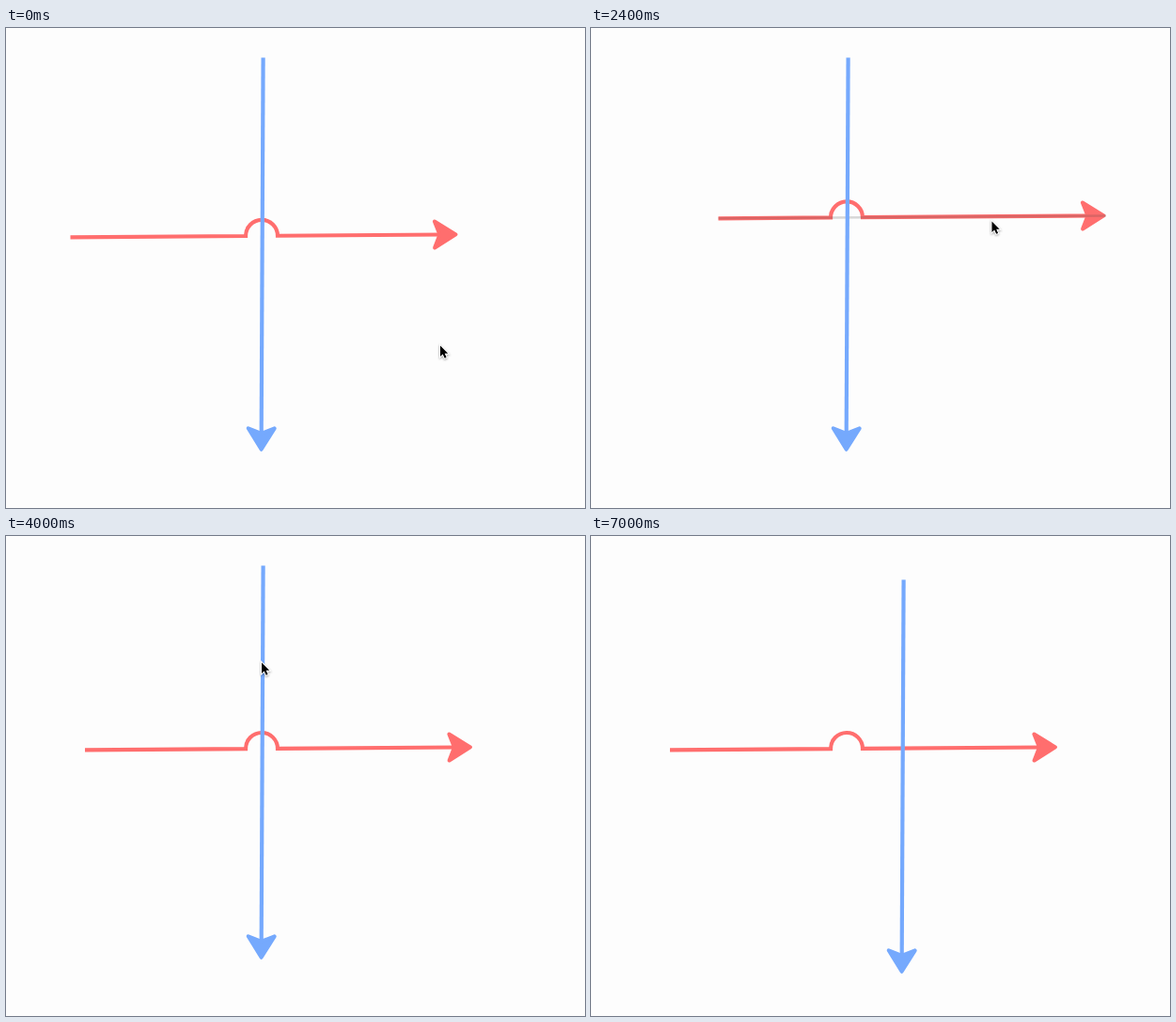
These frames come from a looping animation (616x510 px, 7.1 s). An HTML page:

```html
<!DOCTYPE html>
<html lang="en">
<head>
<meta charset="utf-8">
<title>Line jump</title>
<style>
  html, body { margin: 0; width: 100%; height: 100%; overflow: hidden; background: #fdfdfd; }
  svg { display: block; }
  .line { fill: none; stroke-width: 4.2; }
  .head { stroke-width: 4; stroke-linejoin: round; }
  .guide { stroke: #444; stroke-width: 2.5; opacity: .2; }
  .red .line, .red .head { stroke: #ff6e6e; }
  .red .head { fill: #ff6e6e; }
  .blue .line, .blue .head { stroke: #75a9fd; }
  .blue .head { fill: #75a9fd; }
  #cursor { filter: drop-shadow(0 1px 1px rgba(0, 0, 0, .35)); }
</style>
</head>
<body>
<svg width="616" height="510" viewBox="0 0 616 510">
  <g class="red"><path class="line"/><path class="head"/><path class="guide"/></g>
  <g class="blue"><path class="line"/><path class="head"/><path class="guide"/></g>
  <path id="cursor" d="M1 1.5V13L3.7 10.5L5.7 14.8L7.6 14L5.7 9.7H9.2Z"
        stroke="#fff" stroke-width="2" paint-order="stroke"/>
</svg>
<script>
const LOOP = 7100, STEP = 100;
const HEAD = 'M-2.5 0L-25 -14L-19.5 0L-25 14Z';
const JUMP = { x: 272, r: 17 };

const add = (...points) => points.reduce(([ax, ay], [bx, by]) => [ax + bx, ay + by]);

// A shift by (dx, dy) between two times; power 1 is steady, 2 slows down at the end
function slide(t, start, end, dx, dy, power = 2) {
  const p = Math.min(1, Math.max(0, (t - start) / (end - start)));
  const eased = 1 - (1 - p) ** power;
  return [dx * eased, dy * eased];
}

const redShift = t => add(
  slide(t, 1800, 2400, 67, -20),
  slide(t, 2400, 2700, -33, 10),
  slide(t, 2700, 3200, -18.5, 15));

const blueShift = t => add(
  slide(t, 4500, 4900, 100, 64),
  slide(t, 4900, 5300, -41, -49));

// The pointer also follows whatever it drags
const pointer = t => add(
  [461, 336],
  slide(t, 0, 800, -174, -122),
  slide(t, 800, 1300, 71.5, 10),
  redShift(t),
  slide(t, 3300, 3800, -103, -96),
  slide(t, 4000, 4400, 3, 0),
  blueShift(t),
  slide(t, 5900, 6300, 173, 430, 1));

function makeArrow(name, x1, y1, x2, y2, jumps) {
  const [line, head, guide] = document.querySelector('.' + name).children;
  const angle = Math.atan2(y2 - y1, x2 - x1);
  head.setAttribute('d', HEAD);
  return (shift, dragged) => {
    const from = add([x1, y1], shift), tip = add([x2, y2], shift);
    const end = add(tip, [-16 * Math.cos(angle), -16 * Math.sin(angle)]);
    let bump = '';
    if (jumps) {
      const yAt = x => from[1] + (x - from[0]) * Math.tan(angle);
      const left = JUMP.x - JUMP.r, right = JUMP.x + JUMP.r;
      bump = `L${left} ${yAt(left)}A${JUMP.r} ${JUMP.r} 0 0 1 ${right} ${yAt(right)}`;
    }
    line.setAttribute('d', `M${from}${bump}L${end}`);
    head.setAttribute('transform', `translate(${tip}) rotate(${angle * 180 / Math.PI})`);
    guide.setAttribute('d', dragged ? `M${from}L${tip}` : '');
  };
}

const drawRed = makeArrow('red', 68.5, 222.3, 481, 219.4, true);
const drawBlue = makeArrow('blue', 273.6, 31.5, 271.6, 450.3, false);
const cursor = document.getElementById('cursor');

function render(now) {
  const t = Math.floor(now % LOOP / STEP) * STEP;
  drawRed(redShift(t), t > 1800 && t < 3200);
  drawBlue(blueShift(t), t > 4500 && t < 5600);
  cursor.setAttribute('transform', `translate(${pointer(t)})`);
}

const start = performance.now();
function tick() {
  render(performance.now() - start);
  requestAnimationFrame(tick);
}
tick();
</script>
</body>
</html>
```
